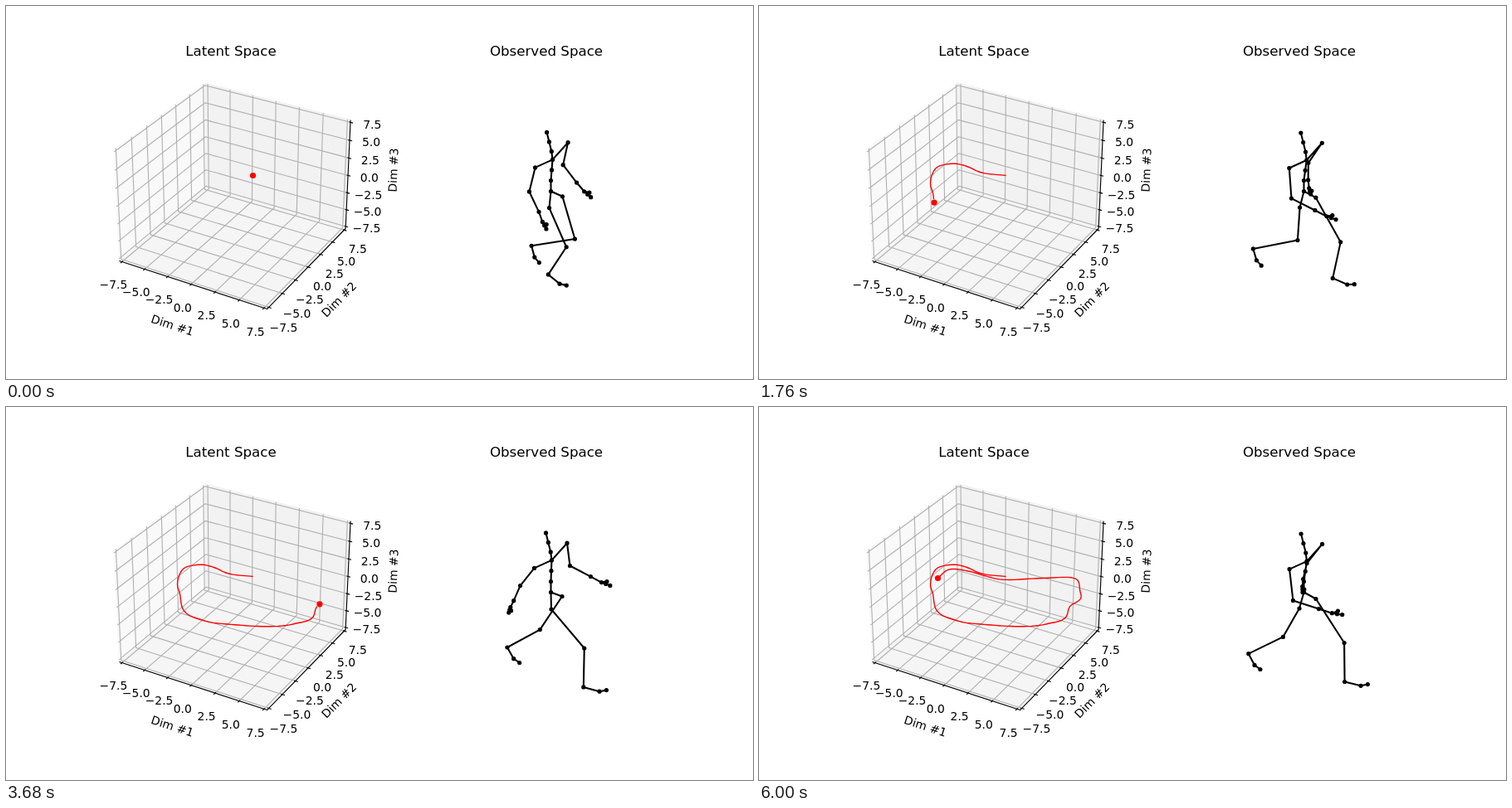
Write an HTML page that moves like this. It is 900x450 px and loops after 6.04 s.

```html
<!DOCTYPE html>
<html lang="en">
<head>
<meta charset="utf-8">
<title>Latent and observed space</title>
<style>
  html, body { margin: 0; width: 100%; height: 100%; overflow: hidden; background: #fff; }
  svg { display: block; width: 900px; height: 450px; }
  text { font: 13.89px "DejaVu Sans", sans-serif; text-anchor: middle; }
  .title { font-size: 16.67px; }
  path { fill: none; stroke-linejoin: round; }
  .dot { stroke-linecap: round; }
</style>
</head>
<body>
<svg viewBox="0 0 900 450">
  <g id="axes"></g>
  <text class="title" x="271" y="60">Latent Space</text>
  <text class="title" x="651" y="60">Observed Space</text>
  <g transform="translate(.5 .5)">
    <path id="trail" stroke="red" stroke-width="1.39"/>
    <path id="marker" class="dot" stroke="red" stroke-width="7.2"/>
    <path id="bones" stroke="#000" stroke-width="2.08"/>
    <path id="dots" class="dot" stroke="#000" stroke-width="5.2"/>
  </g>
</svg>
<script>
const STEP = 40, FRAMES = 151;
const $ = id => document.getElementById(id);

function add(tag, attrs, text = '') {
  const el = document.createElementNS('http://www.w3.org/2000/svg', tag);
  for (const k in attrs) el.setAttribute(k, attrs[k]);
  el.textContent = text;
  $('axes').append(el);
}

// ---- 3D axes: perspective view, elevation 30, azimuth -60 ----
function project([x, y, z]) {
  x *= 0.07619; y *= 0.07619; z *= 0.05714;
  const s = 1713.5 / (10 - (0.433 * x - 0.75 * y + 0.5 * z));
  return [275.3 + s * (0.866 * x + 0.5 * y),
          222.8 - s * (-0.25 * x + 0.433 * y + 0.866 * z)];
}

const poly = pts => pts.length ? 'M' + pts.map(p => p.map(v => v.toFixed(2))).join('L') : '';

function drawAxes() {
  const L = 7.8125, out = L + 0.26, inner = L - 0.13, far = L + 1.5;
  const line = (...pts) => poly(pts.map(project));
  const pane = (grey, ...pts) => add('path', {
    d: line(...pts) + 'Z', style: `fill:${grey}`, stroke: grey, 'stroke-width': 1.39
  });
  const stroke = (colour, ...pts) => add('path', { d: line(...pts), stroke: colour, 'stroke-width': 1.11 });
  const label = (t, p) => {
    const [x, y] = project(p);
    add('text', { x, y: Math.round(y + 10.8) }, t.toFixed(1).replace('-', '\u2212'));
  };

  pane('#f9f9f9', [-L, -L, -L], [-L, L, -L], [-L, L, L], [-L, -L, L]);
  pane('#f2f2f2', [-L, L, -L], [L, L, -L], [L, L, L], [-L, L, L]);
  pane('#f5f5f5', [-L, -L, -L], [L, -L, -L], [L, L, -L], [-L, L, -L]);

  for (let t = -7.5; t <= 7.5; t += 2.5) {
    stroke('#b0b0b0', [t, -L, -L], [t, L, -L], [t, L, L]);
    stroke('#b0b0b0', [L, t, -L], [-L, t, -L], [-L, t, L]);
    stroke('#b0b0b0', [-L, -L, t], [-L, L, t], [L, L, t]);
    stroke('#000', [t, -out, -L], [t, -inner, -L]);
    stroke('#000', [out, t, -L], [inner, t, -L]);
    stroke('#000', [out, L, t], [inner, L, t]);
    label(t, [t, -far, -far]);
    label(t, [far, t, -far]);
    label(t, [far, far, t]);
  }
  stroke('#000', [-L, -L, -L], [L, -L, -L], [L, L, -L], [L, L, L]);

  [[200.5, 385, 18], [401, 354, -45.3], [466.5, 198, -87.6]].forEach(([x, y, turn], i) =>
    add('text', { transform: `translate(${x} ${y}) rotate(${turn})`, dy: '.36em' }, 'Dim #' + (i + 1)));
}

// ---- Smooth curve through [time, ...values] keys ----
function spline(keys, period) {
  const shift = d => keys.map(([t, ...v]) => [t + d, ...v]);
  const k = period ? [...shift(-period), ...keys, ...shift(period)] : keys;
  const slope = (i, c) => {
    const j = Math.max(0, Math.min(k.length - 2, i));
    return (k[j + 1][c] - k[j][c]) / (k[j + 1][0] - k[j][0]);
  };
  const tangent = (i, c) => {
    const before = i ? k[i][0] - k[i - 1][0] : 1;
    const after = k[i + 1] ? k[i + 1][0] - k[i][0] : 1;
    return (slope(i - 1, c) * after + slope(i, c) * before) / (before + after);
  };
  return time => {
    const t = period ? (time + period) % period : time;
    let i = 0;
    while (i < k.length - 2 && k[i + 1][0] <= t) i++;
    const h = k[i + 1][0] - k[i][0], u = (t - k[i][0]) / h, v = 1 - u;
    return k[i].slice(1).map((from, n) =>
      v * v * (1 + 2 * u) * from + u * u * (3 - 2 * u) * k[i + 1][n + 1] +
      h * u * v * (v * tangent(i, n + 1) - u * tangent(i + 1, n + 1)));
  };
}

// ---- Latent trajectory ----
const latent = spline([
  [0, 297, 204], [400, 266, 200], [640, 250, 193], [1000, 229, 190], [1200, 214, 194],
  [1480, 206, 214], [1640, 209, 225], [1820, 212, 242], [2200, 237, 257], [2560, 267, 261.5],
  [3260, 347, 261], [3520, 370, 252], [3640, 374, 240], [3760, 385, 233], [4000, 386, 220],
  [4160, 383, 208], [4480, 341, 206], [4720, 302, 208], [5120, 271, 203], [5400, 254, 198],
  [5760, 227, 196], [6000, 215, 206]
]);
const route = Array.from({ length: FRAMES }, (_, i) => latent(i * STEP));

// ---- Walking figure ----
const STRIDE = 4640, HALF = 2260, ROOT = [656, 223], WAIST = [656, 210];

// Thigh and shank vectors over one stride, shared by both legs.
const legPose = spline([
  [760, 36, 49, -5, 41], [1000, 37, 50, 9, 45], [1380, 37, 50, 0, 47], [2400, 17, 50, -22, 33],
  [3260, -20, 38, -22, 27], [3640, -24, 37, -38, 22], [4580, 16, 48, -54, 7]
], STRIDE);

const plus = ([x, y], dx, dy) => [x + dx, y + dy];
const polar = (p, angle, len) => plus(p, len * Math.cos(angle), len * Math.sin(angle));
const mid = (a, b) => [(a[0] + b[0]) / 2, (a[1] + b[1]) / 2];

// The foot tilts with the shank; splay sets the knees apart.
function leg(hip, t, splay) {
  const [tx, ty, sx, sy] = legPose(t);
  const knee = plus(hip, tx + splay, ty - splay), ankle = plus(knee, sx, sy);
  const lean = Math.atan2(-sx, sy), tilt = 0.25 + 0.75 * lean;
  const ball = polar(ankle, tilt, 20 - 4 * lean);
  return [ROOT, hip, knee, ankle, ball, polar(ball, tilt - 0.45, 8.5)];
}

// Parabola through the back, middle and front places of a swinging joint.
const swing = (s, back, middle, front) => middle.map((m, c) =>
  m + s * (front[c] - back[c]) / 2 + s * s * ((front[c] + back[c]) / 2 - m));

// Fingers and thumb continue the direction from wrist to palm.
function hand(wrist, palm) {
  const dx = palm[0] - wrist[0], dy = palm[1] - wrist[1];
  const angle = Math.atan2(dy, dx) - 0.15, reach = 0.75 * Math.hypot(dx, dy);
  return [[palm, polar(palm, angle, reach / 2), polar(palm, angle, reach)],
          [palm, polar(palm, angle - 0.5, reach * 0.6)]];
}

function figure(t) {
  const s = Math.sin(2 * Math.PI * t / STRIDE - 0.17);
  const sway = (x, y) => [x + 1.3 * s, y + 0.6 * s];
  const chest = sway(658.2, 185), neck = sway(657, 175), head = sway(651.3, 152);

  const lArm = [chest, sway(676.8, 164.3),
    swing(s, [679, 191], [669, 191], [659.5, 188]),
    swing(s, [704, 204], [683, 213], [655, 207]),
    swing(s, [717, 211], [691, 224], [654, 216])];
  const rArm = [chest, sway(637.3, 194.5),
    swing(s, [619, 215], [632, 225], [643, 233]),
    swing(s, [611, 233], [647, 249], [674, 243]),
    swing(s, [607, 241], [653, 261], [690, 248])];

  return [
    [ROOT, WAIST, mid(WAIST, chest), chest, neck, mid(neck, head), head],
    leg([670 + 0.5 * s, 229.5 + 1.5 * s], t, -3),
    leg([653.5 - 3 * s, 243 - 0.5 * s], t - HALF, 3),
    lArm, rArm, ...hand(...lArm.slice(-2)), ...hand(...rArm.slice(-2))
  ];
}

const spot = ([x, y]) => `M${x.toFixed(2)},${y.toFixed(2)}h.01`;

function draw(now) {
  const i = Math.floor(now / STEP) % FRAMES;
  const chains = figure(i * STEP);
  $('trail').setAttribute('d', poly(route.slice(0, i)));
  $('marker').setAttribute('d', spot(route[i]));
  $('bones').setAttribute('d', chains.map(poly).join(''));
  $('dots').setAttribute('d', chains.flat().map(spot).join(''));
}

drawAxes();
draw(0);
let start;
requestAnimationFrame(function tick(now) {
  start ??= now;
  draw(now - start);
  requestAnimationFrame(tick);
});
</script>
</body>
</html>
```
